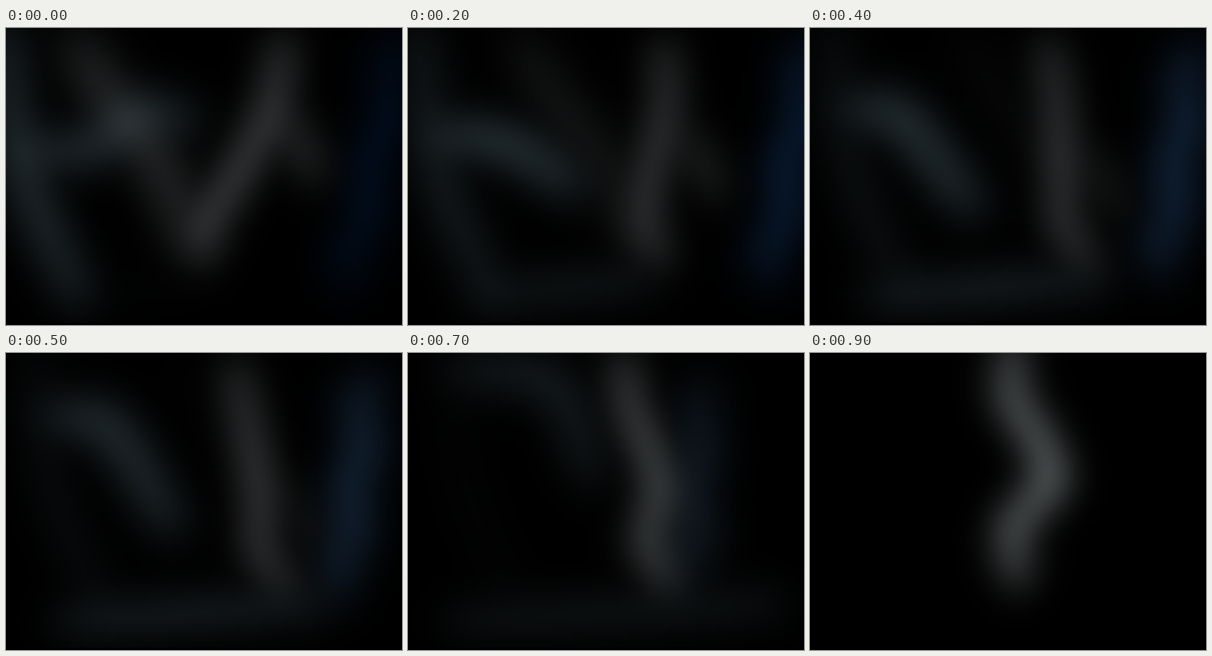
An HTML page with a canvas for the animation above (1000 ms loop, 640 px wide and 480 px high).

```html
<!DOCTYPE html>
<html lang="en">
<head>
<meta charset="utf-8">
<title>Drifting glow</title>
<style>
  html, body { margin: 0; width: 100%; height: 100%; overflow: hidden; background: #000; }
  canvas { display: block; width: 640px; height: 480px; }
  .edge { position: absolute; left: 0; top: 476px; width: 640px; height: 4px; background: #020002; }
</style>
</head>
<body>
<canvas id="glow" width="160" height="120"></canvas>
<div class="edge"></div>
<script>
const SCALE = 4, W = 160, H = 120;
const STEP = 0.1, STEPS = 10;
const SPACING = 20;
const BLEND = 1.5; // between adding overlaps (1) and keeping the brighter one

// A smooth curve through values at the start, the middle and the end.
const MID = 0.5, END = 0.9;
const curve = (t, [a, b, c]) =>
  a * (t - MID) * (t - END) / (MID * END) +
  b * t * (t - END) / (MID * (MID - END)) +
  c * t * (t - MID) / (END * (END - MID));

const range = n => Array.from({ length: n }, (_, i) => i / (n - 1));
const fade = t => Math.min(1, t / 0.7);

// Joints that each follow their own curve.
const bend = (...joints) => t => joints.map(([xs, ys]) => [curve(t, xs), curve(t, ys)]);
// A fixed shape that slides along.
const slide = (vx, vy, ...points) => t => points.map(([x, y]) => [x + vx * t, y + vy * t]);

function blueLine(t) {
  const p = fade(t), x = curve(t, [640, 585, 320]);
  return range(10).map(u => [
    x - 90 * u * (1 - 0.7 * p) + 20 * Math.cos(17 * (u - 0.33)),
    10 + 40 * p + u * (410 - 80 * p)
  ]);
}

function floorLine(t) {
  const p = fade(t);
  return range(6).map(u => [120 - 60 * p + u * (200 + 350 * p), 435 - 30 * u]);
}

const gray = () => [0.95, 1, 1.02];
const cool = () => [0.74, 0.95, 1.05];
const blue = p => [0.06 + 0.42 * p, 0.45 + 0.3 * p, 1];

const strands = [
  { hue: gray, spread: 32, level: [42, 38, 62], joints: bend(
    [[450, 368, 330], [15, 15, -20]],
    [[432, 388, 320], [125, 105, 70]],
    [[390, 400, 368], [210, 170, 135]],
    [[352, 412, 398], [270, 235, 205]],
    [[320, 405, 320], [320, 322, 283]],
    [[318, 465, 338], [375, 385, 375]]) },
  { hue: cool, spread: 36, level: [32, 34, 0], joints: bend(
    [[15, 60, 60], [195, 100, -60]],
    [[140, 160, 290], [200, 105, -60]],
    [[215, 205, 340], [130, 170, -100]],
    [[310, 275, 350], [155, 290, 60]]) },
  { hue: cool, spread: 36, level: [32, 8, 0],
    joints: slide(100, 0, [-5, -10], [15, 190], [50, 295], [125, 450]) },
  { hue: gray, spread: 38, level: [30, 2, 0],
    joints: slide(350, 0, [105, 10], [160, 105], [250, 220], [310, 370]) },
  { hue: gray, spread: 34, level: [26, 12, 0],
    joints: slide(0, 150, [435, 125], [480, 195], [505, 250]) },
  { hue: cool, spread: 34, level: [2, 20, 0], joints: floorLine },
  { hue: blue, spread: 36, level: [22, 36, 0], joints: blueLine }
];

const ctx = document.getElementById("glow").getContext("2d");
const image = ctx.createImageData(W, H);
const glow = new Float32Array(W * H);
const sum = new Float32Array(W * H * 3);

function bell(length, mid, spread) {
  return Float32Array.from({ length }, (_, i) => {
    const d = ((i + 0.5) * SCALE - mid) / spread;
    return Math.exp(-d * d / 2);
  });
}

function addDot(x, y, spread, level) {
  const across = bell(W, x, spread), down = bell(H, y, spread);
  for (let row = 0, k = 0; row < H; row++) {
    const v = level * down[row];
    for (let col = 0; col < W; col++) glow[k++] += v * across[col];
  }
}

// Evenly spaced soft dots merge into a line of the given level.
function addLine(points, spread, level) {
  const parts = points.length - 1;
  for (let i = 0; i < parts; i++) {
    const [x0, y0] = points[i], [x1, y1] = points[i + 1];
    const length = Math.hypot(x1 - x0, y1 - y0);
    const count = Math.ceil(length / SPACING);
    const share = length / count / (spread * Math.sqrt(2 * Math.PI));
    for (let j = 0; j < count; j++) {
      const f = (j + 0.5) / count;
      const swell = 0.7 + 0.3 * Math.sin(Math.PI * (i + f) / parts);
      addDot(x0 + (x1 - x0) * f, y0 + (y1 - y0) * f, spread, level * share * swell);
    }
  }
}

function addStrand({ hue, spread, level, joints }, t) {
  const strength = curve(t, level);
  if (strength < 0.01) return;
  glow.fill(0);
  addLine(joints(t), spread, strength);
  const tint = hue(fade(t)).map(c => c ** BLEND);
  for (let i = 0; i < glow.length; i++) {
    const v = glow[i] ** BLEND;
    for (let c = 0; c < 3; c++) sum[i * 3 + c] += v * tint[c];
  }
}

function draw(t) {
  sum.fill(0);
  strands.forEach(strand => addStrand(strand, t));
  for (let i = 0; i < glow.length; i++) {
    for (let c = 0; c < 3; c++) image.data[i * 4 + c] = sum[i * 3 + c] ** (1 / BLEND);
    image.data[i * 4 + 3] = 255;
  }
  ctx.putImageData(image, 0, 0);
}

let shown = -1;
const began = performance.now();
function tick() {
  const step = Math.floor((performance.now() - began) / 1000 / STEP) % STEPS;
  if (step !== shown) {
    shown = step;
    draw(step * STEP);
  }
  requestAnimationFrame(tick);
}
tick();
</script>
</body>
</html>
```
